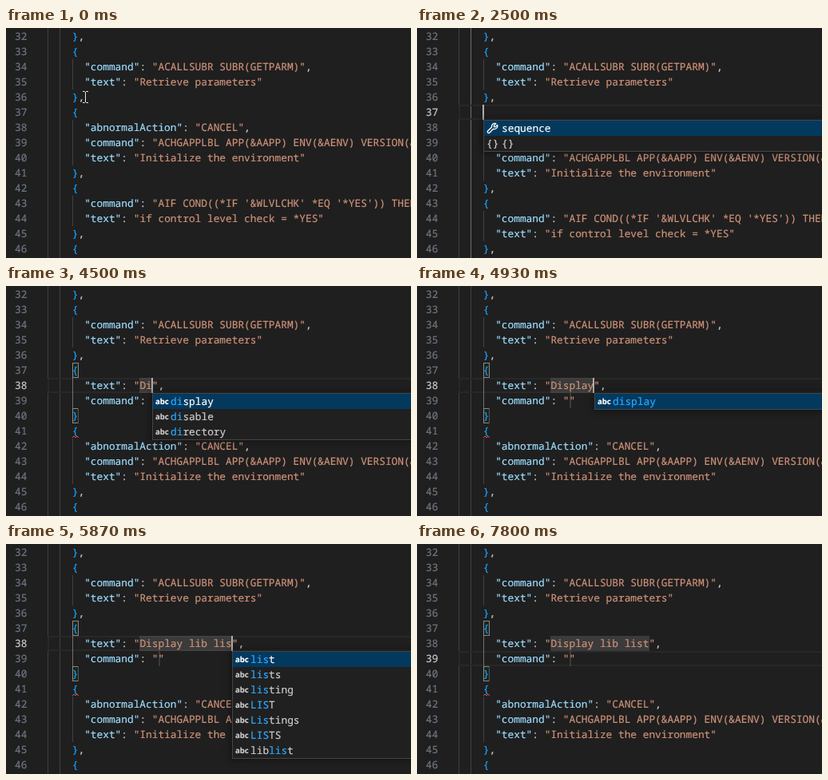
An HTML page for the animation above (8 s loop, 507x288 px).

```html
<!DOCTYPE html>
<html lang="en">
<head>
<meta charset="utf-8">
<title>Snippet completion in an editor</title>
<style>
  html, body { margin: 0; width: 100%; height: 100%; overflow: hidden; background: #1f1f1f; }
  #stage {
    position: relative; width: 507px; height: 288px; overflow: hidden; color: #ccc;
    font: 12.828px/19px "Noto Sans Mono", monospace; text-rendering: geometricPrecision;
    font-variant-ligatures: none; -webkit-text-stroke: .2px;
  }
  #stage div, #stage svg { position: absolute; box-sizing: border-box; white-space: pre; }
  .num { color: #6e7681; }
  .num.on { color: #ccc; }
  .key { color: #9cdcfe; }
  .str { color: #ce9178; }
  .brace { color: #179fff; }
  .guide { background: #404040; }
  .guide.on { background: #707070; }
  .current { border: 2px solid #282828; }
  .field { background: #7c7c7c4d; }
  .stop { background: #525252; }
  .match { border: 1px solid #888; background: #0064001a; }
  .caret { background: #aeafad; }
  #stage .popup {
    width: 430px; background: #202020; border: 1px solid #454545;
    box-shadow: 0 0 8px 2px #0000005c;
  }
  #stage .popup > div { left: 0; width: 100%; height: 19px; }
  .popup .pick { background: #04395e; color: #fff; }
  #stage .popup .label { left: 22px; }
  .popup b { color: #2aaaff; font-weight: 400; }
  .abc { left: 3px; font: 600 9.5px/19px "Noto Sans", sans-serif; }
</style>
</head>
<body>
<div id="stage"></div>
<script>
const stage = document.getElementById('stage');
const LOOP = 8000, ROW = 19, LEFT = 52, CHAR = 7.697, FIRST = 32;
const ENTER = 1470, SUGGEST = 1830, INSERT = 2570, CLOSE = 6570, NEXT_FIELD = 7300;

const phrase = 'Display lib list';
const keyTimes = [4400, 4470, 4570, 4670, 4770, 4830, 4930,
  5070, 5170, 5270, 5430, 5530, 5670, 5730, 5870, 6030];
const caretToggles = [70, 570, 1070, 1900, 2500, 3100, 3600, 4100, 4400, 6500, 7000, 7800];
const words = ('lib liblist libraries library Library LIB LIBL LLIB list lists listing LIST ' +
  'Listings LISTS level label display disable directory data date delete default').split(' ');

const command = s => `"command": "${s}"`;
const text = s => `"text": "${s}"`;
const before = ['},', '{', command('ACALLSUBR SUBR(GETPARM)') + ',', text('Retrieve parameters'), '},'];
const after = ['{', '"abnormalAction": "CANCEL",',
  command('ACHGAPPLBL APP(&AAPP) ENV(&AENV) VERSION(&AVER)') + ',', text('Initialize the environment'), '},',
  '{', command("AIF COND((*IF '&WLVLCHK' *EQ '*YES')) THEN(*DO)") + ',',
  text('if control level check = *YES'), '},', '{'];

const colX = col => LEFT + col * CHAR;
const rowY = line => 1 + (line - FIRST) * ROW;
const passed = (times, t) => times.filter(k => k <= t).length;
const escapeHtml = s => s.replace(/&/g, '&amp;');

function box(cls, x, y, w, h, content = '') {
  const size = (w ? `width:${w}px;` : '') + (h ? `height:${h}px` : '');
  return `<div class="${cls}" style="left:${x}px;top:${y}px;${size}">${content}</div>`;
}

const guide = (col, y, h, on) => box('guide' + (on ? ' on' : ''), Math.round(colX(col)), y, 1, h);

function highlight(line) {
  return line.replace(/"[^"]*"(?=(:?))|[{}]/g, (token, colon) => {
    const cls = token[0] !== '"' ? 'brace' : colon ? 'key' : 'str';
    return `<span class="${cls}">${escapeHtml(token)}</span>`;
  });
}

function popup(x, y, rows) {
  const items = rows.map(([icon, label], i) =>
    `<div class="${i ? '' : 'pick'}" style="top:${i * ROW}px">${icon}<div class="label">${label}</div></div>`);
  return box('popup', Math.floor(x) + 1, y, 0, rows.length * ROW + 2, items.join(''));
}

const wrench = `<svg style="left:3px;top:2px" width="15" height="15" fill="none" stroke="#fff" stroke-width="1.3"
  stroke-linejoin="round"><path d="M11.8 1.6 9.4 4v1.8h1.8l2.4-2.4a3.9 3.9 0 0 1-5 4.9L4 13a1.5 1.5 0 0 1-2.2-2.2L6.6 6a3.9 3.9 0 0 1 5.2-4.4Z"/></svg>`;
const snippetRows = [[wrench, 'sequence'], ['<div style="left:3px">{}</div>', '{}']];

function wordRows(typed) {
  const find = w => w.toLowerCase().indexOf(typed.toLowerCase());
  return words.filter(w => find(w) >= 0).sort((a, b) => find(a) - find(b)).slice(0, 12).map(w => {
    const i = find(w), end = i + typed.length;
    return ['<div class="abc">abc</div>', `${w.slice(0, i)}<b>${w.slice(i, end)}</b>${w.slice(end)}`];
  });
}

function pointer(t) {
  const p = Math.min(1, Math.max(0, (t - 440) / 190)), ease = p * p * (3 - 2 * p);
  const x = 95 + 371 * ease, y = 78 + 111 * ease;
  return `<svg style="left:${x}px;top:${y}px" width="9" height="17" fill="none">
    <path d="M1 1.5h2.5l1 1 1-1H8M4.5 2v13M1 15.5h2.5l1-1 1 1H8" stroke="#e8e8e8"/></svg>`;
}

function draw(t) {
  const typed = phrase.slice(0, passed(keyTimes, t));
  const inserted = t >= INSERT, blank = t >= ENTER && !inserted;
  const added = inserted ? ['{', text(typed) + ',', command(''), '}'] : blank ? [''] : [];
  const lines = [...before, ...added, ...after].slice(0, 15);
  const [line, col] = t < ENTER ? [36, 6] : blank ? [37, 4] : t < NEXT_FIELD ? [38, 15 + typed.length] : [39, 18];
  const focused = t >= 70, caretX = colX(col), caretY = rowY(line);
  const activeFirst = inserted ? 38 : 34;

  let html = guide(0, 0, 288) + guide(2, 0, 288, blank);
  if (focused) html += box('current', LEFT, caretY, 460, ROW);
  if (inserted) {
    html += box('field', colX(15), rowY(38), Math.max(2, typed.length * CHAR), ROW)
      + box('field', colX(18), rowY(39), 2, ROW)
      + box('match', 83, rowY(37), 8, ROW) + box('match', 83, rowY(40), 8, ROW)
      + box('stop', 90, rowY(40), 1, ROW);
  }
  lines.forEach((source, i) => {
    const n = FIRST + i, y = rowY(n), nested = source[0] === '"';
    const active = focused && !blank && (n === activeFirst || n === activeFirst + 1);
    if (nested) html += guide(4, y, ROW, active);
    html += box('num' + (focused && n === line ? ' on' : ''), 11, y, 0, 0, n)
      + box('', colX(nested ? 6 : 4), y, 0, 0, highlight(source));
  });
  if (inserted) {
    html += `<svg style="left:83px;top:${rowY(41) + 15}px" width="8" height="4" fill="none">
      <path d="M0 3 2 1l2 2 2-2 2 2" stroke="#f14c4c"/></svg>`;
  }
  if (passed(caretToggles, t) % 2) html += box('caret', Math.round(caretX - 1), caretY, 2, ROW);

  const word = typed.split(' ').pop();
  if (blank && t >= SUGGEST) html += popup(caretX, caretY + ROW, snippetRows);
  else if (word && t < CLOSE) html += popup(caretX, caretY + ROW, wordRows(word));
  if (t < ENTER) html += pointer(t);
  return html;
}

let shown = '';
function tick() {
  const html = draw(performance.now() % LOOP);
  if (html !== shown) stage.innerHTML = shown = html;
  requestAnimationFrame(tick);
}
tick();
</script>
</body>
</html>
```
